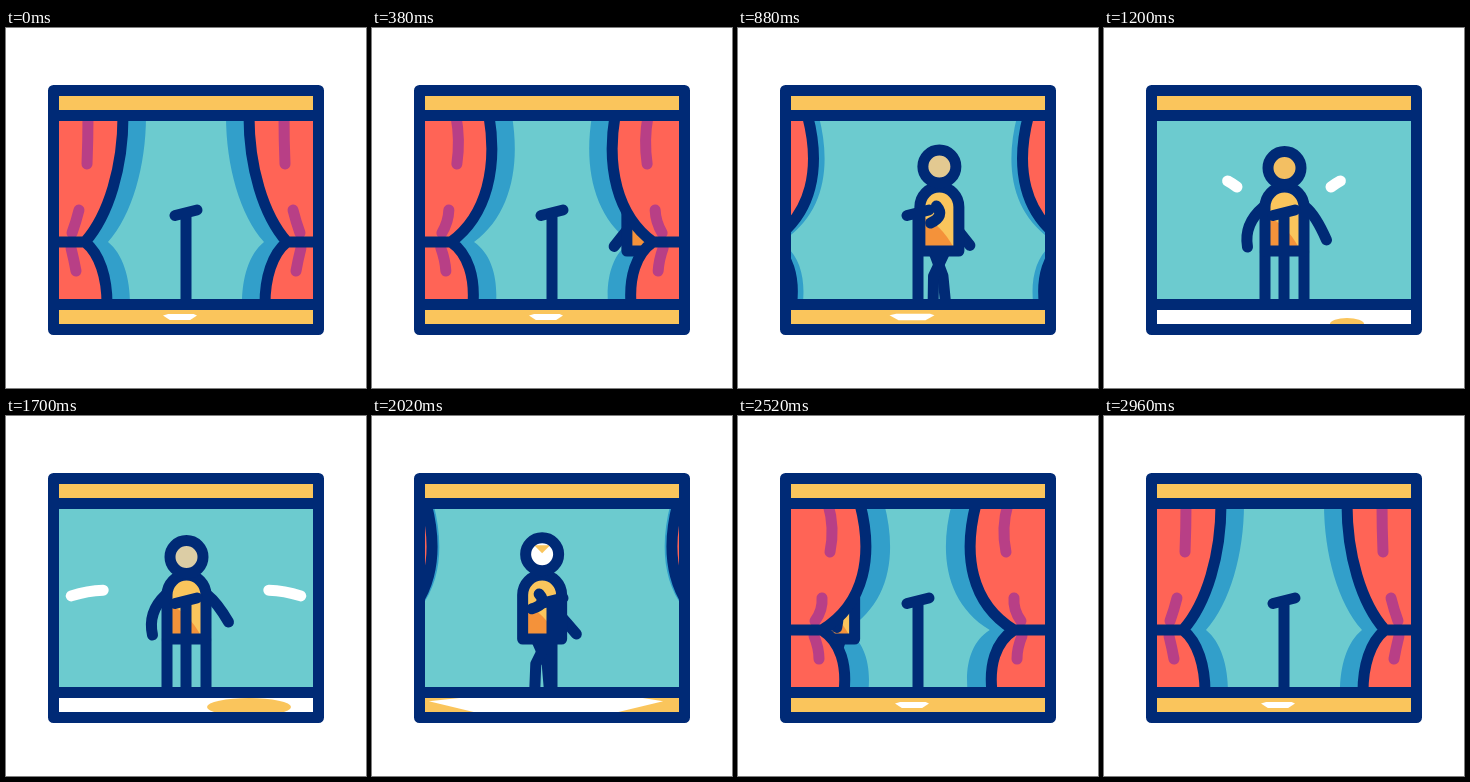
These frames come from a looping animation (360 px wide and 360 px high, 3 s). An HTML page with a canvas:

```html
<!DOCTYPE html>
<html lang="en">
<head>
<meta charset="utf-8">
<title>Singer on stage</title>
<style>
  html, body { margin: 0; width: 100%; height: 100%; overflow: hidden; background: #fff; }
  canvas { display: block; width: 360px; height: 360px; }
</style>
</head>
<body>
<canvas id="stage"></canvas>
<script>
const LOOP = 3000, ENTER = 1024, LEAVE = 1950, SPEED = 0.146;
const NAVY = '#002a76', TEAL = '#6ccbcf', BLUE = '#329fca', GOLD = '#fac55c',
      RED = '#ff6456', PLUM = '#b83f86', ORANGE = '#f4923a', WHITE = '#fff';

const canvas = document.getElementById('stage');
const ratio = window.devicePixelRatio || 1;
canvas.width = canvas.height = Math.round(360 * ratio);
const g = canvas.getContext('2d');

const ramp = (t, a, b) => Math.max(0, Math.min(1, (t - a) / (b - a)));
const ease = (t, a, b) => { const p = ramp(t, a, b); return p * p * (3 - 2 * p); };
const mix = (a, b, p) => a + (b - a) * p;
const mixAll = (a, b, p) => a.map((v, i) => mix(v, b[i], p));

function stroke(d, color = NAVY) {
  g.strokeStyle = color;
  g.stroke(new Path2D(d));
}

function fill(d, color) {
  g.fillStyle = color;
  g.fill(new Path2D(d));
}

function box(x, y, w, h, color) {
  g.fillStyle = color;
  g.fillRect(x, y, w, h);
}

function oval(x, y, rx, ry, color) {
  g.beginPath();
  g.ellipse(x, y, rx, ry, 0, 0, 7);
  g.fillStyle = color;
  g.fill();
}

function mirrored(draw) {
  draw();
  g.save();
  g.translate(360, 0);
  g.scale(-1, 1);
  draw();
  g.restore();
}

// Curtains speed up as they open, then swing back a little too far and settle.
function drape(t) {
  const open = ramp(t, 530, 1100) ** 2;
  const shut = 1 - (1 - ramp(t, 1750, 2520)) ** 1.5;
  const settle = ease(t, 2520, 2960);
  const pull = 125 * open - 130 * shut + 5 * settle;
  const b = ease(t, 0, 640) - settle;
  const top = 117 - pull, knot = 79 - pull, hem = 101 - pull;
  const upper = `${top} 88C${top + 13 * b} 138 ${top - 14 + 20 * b} 187 ${knot} 214`;
  const lower = `C${knot + 15 + 4 * b} 226 ${hem + 3 * b} 250 ${hem} 276`;
  return { pull, b, top, knot, edge: upper + lower, cloth: `M-200 88L${upper}${lower}H-200Z` };
}

function shadow({ cloth, pull }) {
  g.save();
  g.translate(23 - pull / 4, 0);
  fill(cloth, BLUE);
  g.restore();
}

function curtain({ b, top, knot, edge, cloth }) {
  fill(cloth, RED);
  const x = top - 35 + 6 * b;
  stroke(`M${x - 3 * b} 88Q${x + 4 * b} 112 ${x - 1} 136`, PLUM);
  stroke(`M${x - 9} 182Q${x - 12 + 4 * b} 194 ${x - 16} 205`, PLUM);
  stroke(`M${x - 17} 220Q${x - 14 + 2 * b} 232 ${x - 12} 243`, PLUM);
  stroke(`M${edge}M-200 214H${knot}`);
}

function limb(x, p) {
  stroke(`M${x + p[0]} ${p[1]}Q${x + p[2]} ${p[3]} ${x + p[4]} ${p[5]}`);
}

function singer(t) {
  const x = 180.5 + SPEED * (Math.max(0, ENTER - t) - Math.max(0, t - LEAVE));
  const still = ease(t, ENTER - 35, ENTER + 75) - ease(t, LEAVE - 40, LEAVE + 60);
  const s = Math.sin((t - 640) / 376.5 * 2 * Math.PI);
  const lift = Math.abs(s);
  const sway = ramp(t, 1200, 1700);

  const farArm = mixAll(
    [0, 180, 1 - 18 * s, 197, 2 - 37 * s, 212 + 7 * lift],
    [-21, 179, -41 + 2 * sway, 196, -37 + 3 * sway, 219], still);
  const nearArm = mixAll(
    [-3, 178, 6, 188, 2 + 14 * s, 212 - 22 * lift],
    [21, 179, 31, 187, 42, 212 - 6 * sway], still);

  limb(x, farArm);
  for (const d of [-1, 1]) {
    const [hip, knee, foot] = mixAll(
      [5 * d, -5 * (1 - lift) + d * (3 + 10 * s), d * (3 + 12 * s)],
      [19.5 * d, 19.5 * d, 19.5 * d], still);
    stroke(`M${x + hip} 225L${x + knee} 248L${x + foot} 276`);
  }

  const torso = `M${x - 19.5} 223V179A19.5 20 0 0 1 ${x + 19.5} 179V223Z`;
  fill(torso, GOLD);
  fill(`M${x - 15} 190Q${x + 1} 196 ${x + 14} 219H${x - 15}Z`, ORANGE);
  stroke(torso);
  limb(x, nearArm);
  head(t, x, 140 + sway * still - 2 * lift * (1 - still));
}

function head(t, x, y) {
  const leaving = t > LEAVE;
  const glow = 1 - Math.min(1, Math.abs(t - 1200) / 450);
  const skin = mixAll([220, 205, 165], [243, 191, 98], glow).map(Math.round);
  oval(x, y, 16.5, 16.5, leaving ? WHITE : `rgb(${skin})`);
  if (leaving) fill(`M${x - 8} ${y - 9}H${x + 8}L${x} ${y - 1}Z`, GOLD);
  g.beginPath();
  g.arc(x, y, 16.5, 0, 7);
  g.strokeStyle = NAVY;
  g.stroke();
}

function streak(d, length, head, tail) {
  if (head <= tail) return;
  g.setLineDash([(head - tail) * length, 400]);
  g.lineDashOffset = -tail * length;
  stroke(d, WHITE);
  g.setLineDash([]);
}

function sound(t) {
  streak('M133 159Q117 147 96 144', 42, ramp(t, 1165, 1300), ramp(t, 1290, 1450));
  streak('M125 178Q95 169 62 181', 65, ramp(t, 1500, 1715), ramp(t, 1610, 1820));
}

// A white glint widens to fill the floor while the singer performs.
function floor(t) {
  const lit = ease(t, 850, 1100) - ease(t, 1850, 2400);
  const x = 174, w = 17 + 130 * lit, h = 3 + 6 * lit;
  box(48, 277, 264, 24, GOLD);
  fill(`M${x - w} ${289 - h / 2}L${x - w * 0.7} ${289 - h}H${x + w * 0.8}L${x + w} ${289 - h / 2}
    L${x + w * 0.6} ${289 + h}H${x - w * 0.6}Z`, WHITE);
  if (lit < 0.95) return;
  box(48, 277, 264, 24, WHITE);
  const p = ramp(t, 1200, 1700);
  oval(243, 296 - 5 * p, 17 + 25 * p, 6 + 3 * p, GOLD);
}

function draw(t) {
  const cloth = drape(t);
  g.setTransform(ratio, 0, 0, ratio, 0, 0);
  box(0, 0, 360, 360, WHITE);
  g.lineWidth = 11;
  g.lineCap = g.lineJoin = 'round';

  g.save();
  g.beginPath();
  g.rect(48, 63, 264, 238);
  g.clip();
  box(48, 88, 264, 188, TEAL);
  mirrored(() => shadow(cloth));
  mirrored(() => sound(t));
  singer(t);
  stroke('M180 186V276M169 187.5L191 182');
  mirrored(() => curtain(cloth));
  box(48, 63, 264, 25, GOLD);
  floor(t);
  g.restore();

  stroke('M47.5 62.5H312.5V301.5H47.5ZM48 87.5H312M48 276.5H312');
}

function tick() {
  draw(performance.now() % LOOP);
  requestAnimationFrame(tick);
}
tick();
</script>
</body>
</html>
```
